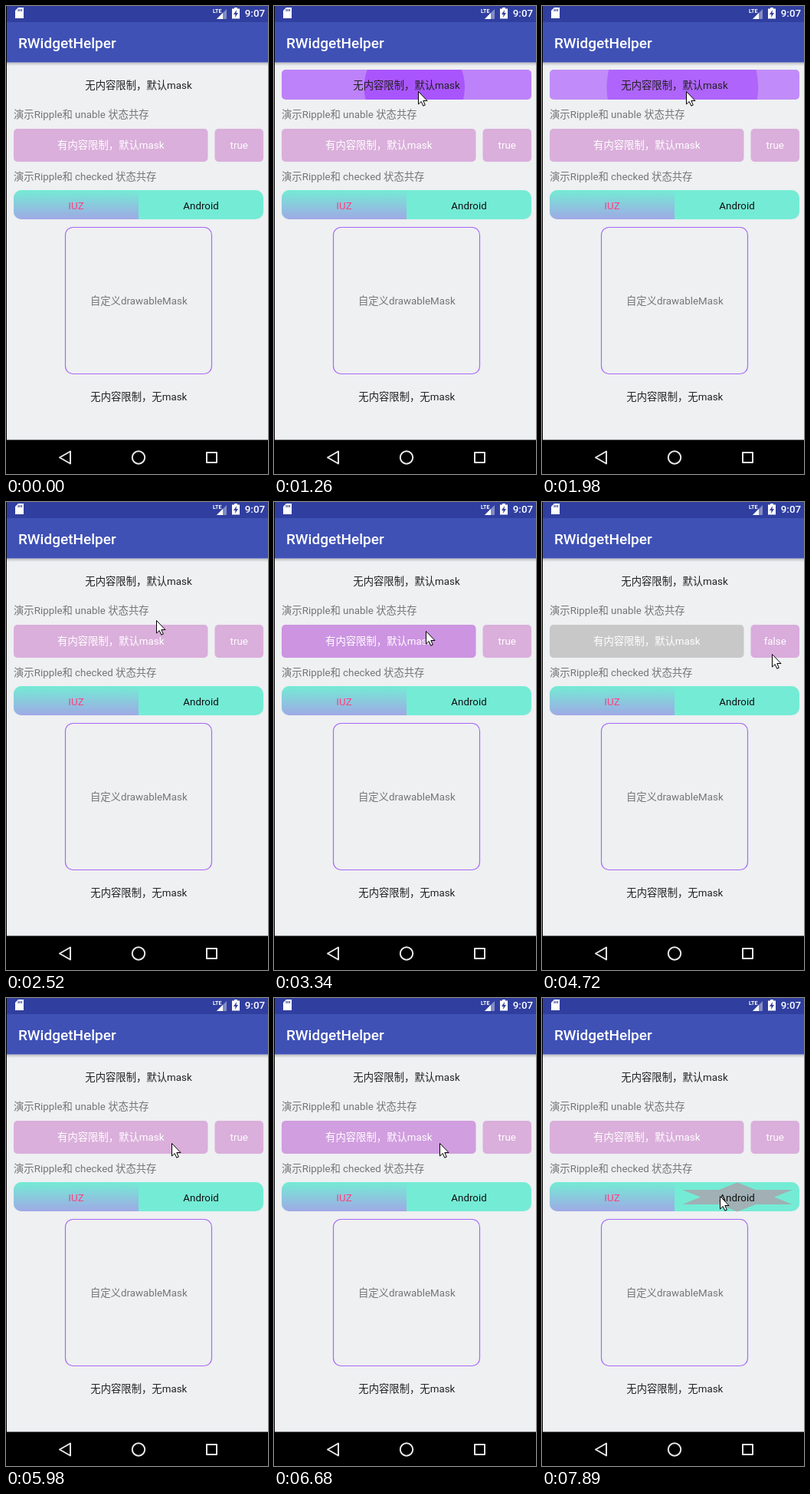
Recreate the animation shown at these times as an HTML page with a canvas. Size 342x610 px, loop 8000 ms.

```html
<!DOCTYPE html>
<html lang="zh">
<head>
<meta charset="utf-8">
<style>
html, body { margin: 0; width: 100%; height: 100%; overflow: hidden; background: #000; }
canvas { display: block; width: 342px; height: 610px; }
</style>
</head>
<body>
<canvas id="stage" width="342" height="610"></canvas>
<script>
const ctx = document.getElementById('stage').getContext('2d');
const FONT = 'Roboto, "Noto Sans CJK SC", "Noto Sans CJK", sans-serif';
const LOOP = 8000;
const TICK = 138;    // the picture advances in even ticks
const ENTRY = 292;   // tick on which the pointer appears
const POINTER = new Path2D('M0 0V16.5L3.7 13L6.3 18.7L8.8 17.6L6.3 12H11.5Z');

const entryPoint = { x: 278, y: 553 };
const moves = [
  { start: ENTRY, end: 840, x: 188, y: 111 },
  { start: 2100, end: 2630, x: 198, y: 168 },
  { start: 3330, end: 4010, x: 288, y: 187 },
  { start: 4030, end: 4570, x: 300, y: 198 },
  { start: 5580, end: 5940, x: 216, y: 189 },
  { start: 6800, end: 7180, x: 232, y: 258 }
];

const clamp = v => Math.max(0, Math.min(1, v));
const progress = (t, start, end) => clamp((t - start) / (end - start));
const holdTick = t => ENTRY + Math.floor((t - ENTRY) / TICK) * TICK;

// Strength of a touch: quick rise, slow sag while held, fade after release
function press(t, down, up, sag) {
  const age = t - down;
  if (age < 0) return 0;
  const rise = clamp((age + TICK) / (2 * TICK));
  return rise * (1 - sag * clamp(age / 900)) * (1 - progress(t, up, up + 350));
}

function rect(x, y, w, h, color) {
  ctx.fillStyle = color;
  ctx.fillRect(x, y, w, h);
}

function roundPath(x, y, w, h, r) {
  ctx.beginPath();
  ctx.roundRect(x, y, w, h, r);
}

function fillPath(d, color) {
  ctx.fillStyle = color;
  ctx.fill(new Path2D(d));
}

function text(str, x, y, color, align = 'center', size = 13.35, weight = 400) {
  ctx.font = `${weight} ${size}px ${FONT}`;
  ctx.fillStyle = color;
  ctx.textAlign = align;
  ctx.fillText(str, x, y);
}

function verticalFade(top, bottom, from, to) {
  const fade = ctx.createLinearGradient(0, top, 0, bottom);
  fade.addColorStop(0, from);
  fade.addColorStop(1, to);
  return fade;
}

function statusBar() {
  rect(0, 0, 342, 21, '#303f9f');
  fillPath('M16 2H23V16H12V6Z', '#fff');
  for (let i = 0; i < 3; i++) rect(15.5 + i * 2.2, 4, 1.1, 3, '#303f9f');
  fillPath('M288 4V17H275Z', 'rgba(255,255,255,.4)');
  fillPath('M283 9V17H275Z', '#fff');
  text('LTE', 270, 9, '#fff', 'left', 7, 700);
  fillPath('M298 2H302V3.5H305V16.5H295V3.5H298Z', '#fff');
  fillPath('M301 5L297 11H299.5L299 15L303 9H300.5Z', '#303f9f');
  text('9:07', 338, 14, '#fff', 'right', 13.3, 500);
}

function appBar() {
  rect(0, 73.5, 342, 4.5, verticalFade(73.5, 78, 'rgba(0,0,0,.22)', 'rgba(0,0,0,0)'));
  rect(0, 21, 342, 52.5, '#3f51b5');
  text('RWidgetHelper', 16, 55, '#fff', 'left', 19, 500);
}

function topButton(t) {
  const down = 1100;
  const level = press(t, down, 1990, .12);
  if (level) {
    ctx.save();
    roundPath(10, 83, 326, 39, 5);
    ctx.clip();
    ctx.globalAlpha = .635 * level;
    rect(10, 83, 326, 39, '#a040ff');
    ctx.globalAlpha = .73 * level ** 3;
    ctx.beginPath();
    ctx.arc(183.3, 106, 19.2 * (t - down) ** .243, 0, Math.PI * 2);
    ctx.fill();
    ctx.restore();
  }
  text('无内容限制，默认mask', 173, 108, '#212121');
}

function pinkButton(x, w, label, level, color = '#daafdb') {
  roundPath(x, 160, w, 43, 5);
  ctx.fillStyle = color;
  ctx.fill();
  ctx.globalAlpha = .268 * level;
  ctx.fillStyle = '#a040f0';
  ctx.fill();
  ctx.globalAlpha = 1;
  text(label, x + w / 2, 186, '#fff');
}

function pinkRow(t) {
  const disabled = t >= 4430 && t < 5400;
  const wide = press(t, 3040, 4030, .33) + press(t, 6230, 6530, .33);
  const small = press(t, 4290, 4400, .33) + press(t, 5260, 5400, .33);
  pinkButton(10, 253.5, '有内容限制，默认mask', wide, disabled ? '#c8c8c8' : undefined);
  pinkButton(272.5, 63.5, String(!disabled), small);
}

// Stretched six-pointed star
function star(cx, cy, w, h) {
  ctx.beginPath();
  for (let i = 0; i < 12; i++) {
    const angle = i * Math.PI / 6;
    const r = i % 2 ? 1 / Math.sqrt(3) : 1;
    ctx.lineTo(cx + Math.sin(angle) * r * w * 2 / Math.sqrt(3), cy - Math.cos(angle) * r * h);
  }
  ctx.fillStyle = '#a0b0b4';
  ctx.fill();
}

function tabs(t) {
  roundPath(10, 240, 326, 38, 10);
  ctx.fillStyle = '#74ebd5';
  ctx.fill();
  roundPath(10, 240, 163, 38, [10, 0, 0, 10]);
  ctx.fillStyle = verticalFade(240, 278, '#74ebd5', '#9fa9e5');
  ctx.fill();
  ctx.globalAlpha = progress(t, 7250, 7750) * (t > 7450);
  star(255, 259.5, 72, 19);
  ctx.globalAlpha = 1;
  text('IUZ', 91.5, 264.5, '#ff4081');
  text('Android', 254.5, 264.5, '#111');
}

function frameBox() {
  roundPath(77.5, 288.5, 191, 191, 10);
  ctx.strokeStyle = '#a968f5';
  ctx.lineWidth = 1.2;
  ctx.stroke();
  text('自定义drawableMask', 173.3, 389, '#757575');
}

function navBar() {
  rect(0, 565.5, 342, 44.5, '#000');
  ctx.strokeStyle = '#e8e8e8';
  ctx.lineWidth = 2;
  ctx.lineJoin = 'round';
  ctx.stroke(new Path2D('M70 588.5L84 580.5V596.5Z'));
  ctx.beginPath();
  ctx.arc(173, 588.5, 8.2, 0, Math.PI * 2);
  ctx.stroke();
  ctx.strokeRect(262, 582, 13, 13);
}

function pointer(t) {
  let { x, y } = entryPoint;
  for (const move of moves) {
    const p = progress(t, move.start, move.end);
    x += (move.x - x) * p;
    y += (move.y - y) * p;
  }
  ctx.save();
  ctx.translate(Math.round(x) + .5, Math.round(y) + .5);
  ctx.fillStyle = '#fff';
  ctx.fill(POINTER);
  ctx.strokeStyle = '#000';
  ctx.lineWidth = 1;
  ctx.lineJoin = 'miter';
  ctx.stroke(POINTER);
  ctx.restore();
}

function draw(t) {
  rect(0, 0, 342, 610, '#eef0f2');
  appBar();
  statusBar();
  topButton(t);
  text('演示Ripple和 unable 状态共存', 10, 146, '#757575', 'left');
  pinkRow(t);
  text('演示Ripple和 checked 状态共存', 10, 226.5, '#757575', 'left');
  tabs(t);
  frameBox();
  text('无内容限制，无mask', 173.3, 514, '#212121');
  navBar();
  rect(0, 0, 1, 610, '#000');
  if (t >= ENTRY) pointer(t);
}

const begin = performance.now();
function frame() {
  draw(holdTick((performance.now() - begin) % LOOP));
  requestAnimationFrame(frame);
}
frame();
</script>
</body>
</html>
```
